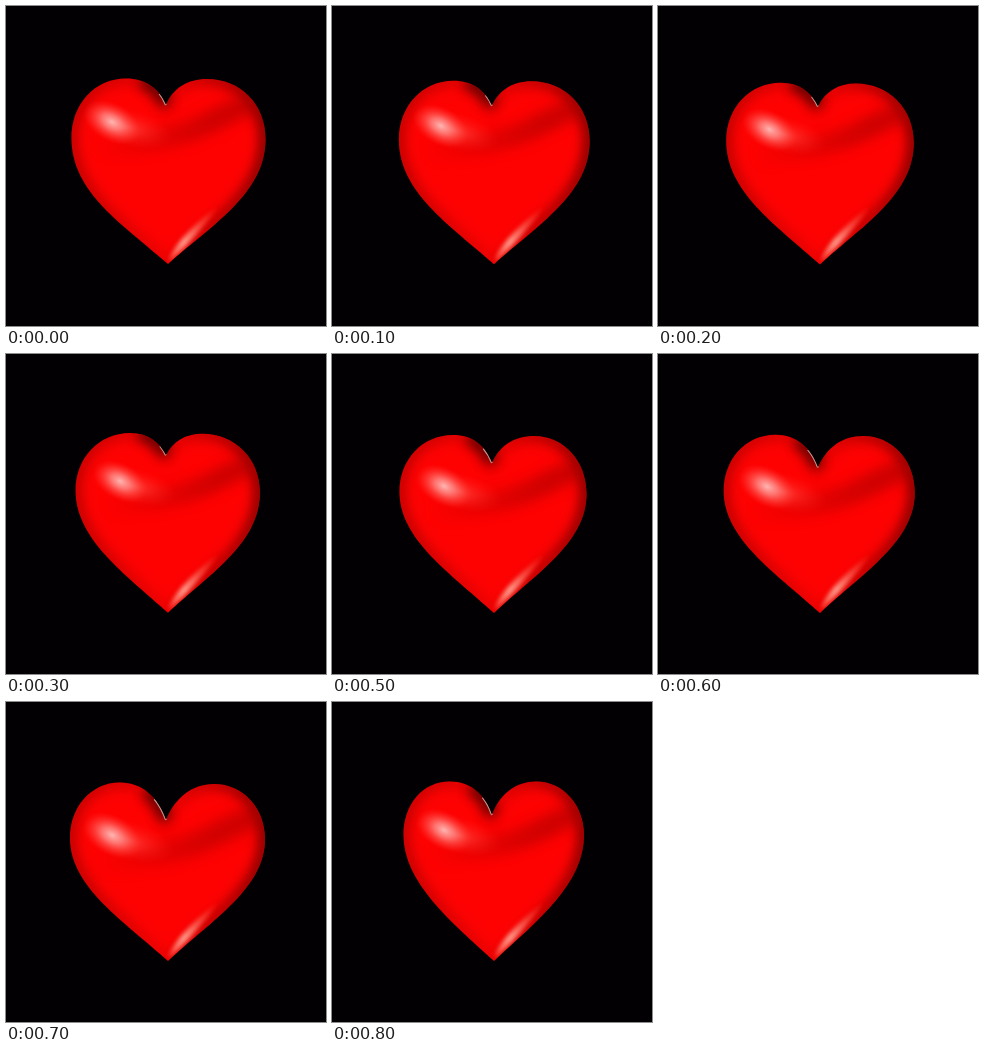
An HTML page without scripts for the animation above (0.9 s loop, 320x320 px).

```html
<!DOCTYPE html>
<html lang="en">
<head>
<meta charset="utf-8">
<title>Beating heart</title>
<style>
html, body { margin: 0; width: 100%; height: 100%; overflow: hidden; background: #020002; }
svg { display: block; width: 100vw; height: 100vh; }

.heart, .light, .glint { animation: 900ms infinite steps(1); }
.heart { animation-name: beat; }
.light { animation-name: drift; transform-origin: 104px 114px; }
.glint { animation-name: beat, stretch; }

/* Outline poses: cleft, left lobe, tip, right lobe */
@keyframes beat {
  0% {
    d: path("M160 99 C153 82 139 72.5 120 72.5 C89 72.5 65.5 98 65.5 132 C65.5 187 118 219 162 258 C207 218 259.5 187 259.5 133 C259.5 98 234 73 201 73 C182 73 167 82 160 99Z");
    animation-timing-function: steps(4);
  }
  44.4% {
    d: path("M160 102 C153 89 142 81 126 81 C94 81 71 106 71 138 C71 184 118 219 162 259 C206 218 252 189 252 140 C252 107 227 82 195 82 C179 82 167 89 160 102Z");
  }
  55.5% {
    d: path("M160 109 C153 91 140 81 121 81 C90 81 67.5 106 67.5 138 C67.5 185 118 219 162 259 C206 218 254.5 188 254.5 140 C254.5 107 232 82 202 82 C183 82 168 91 160 109Z");
    animation-timing-function: steps(2);
  }
  77.7% {
    d: path("M160 118 C152 95 136 80.5 114 80.5 C85 80.5 64 105 64 136 C64 185 118 219 162 259 C206 218 259 186 259 137 C259 106 237 82 208 82 C186 82 169 96 160 118Z");
  }
  88.8%, 100% {
    d: path("M160 113 C153 92 138 79.5 118 79.5 C90 79.5 71.5 103 71.5 133 C71.5 180 118 219 162 259 C206 218 252 182 252 133 C252 104 232 79.5 204 79.5 C185 79.5 168 91 160 113Z");
  }
}
@keyframes drift {
  0% { transform: translate(0, 0) scale(1); animation-timing-function: steps(4); }
  44.4% { transform: translate(11px, 15px) scale(.94); }
  55.5% { transform: translate(6px, 16px) scale(.98); animation-timing-function: steps(2); }
  77.7% { transform: translate(0, 17px) scale(1.04); }
  88.8%, 100% { transform: translate(6px, 12px) scale(.98); }
}
@keyframes stretch {
  0% { stroke-dasharray: 13 2000; animation-timing-function: steps(4); }
  44.4% { stroke-dasharray: 10 2000; }
  55.5% { stroke-dasharray: 17 2000; animation-timing-function: steps(2); }
  77.7% { stroke-dasharray: 24 2000; }
  88.8%, 100% { stroke-dasharray: 20 2000; }
}
</style>
</head>
<body>
<svg viewBox="0 0 320 320">
  <defs>
    <clipPath id="shape"><path class="heart"/></clipPath>
    <radialGradient id="core">
      <stop offset="0" stop-color="#ffc8c4" stop-opacity=".9"/>
      <stop offset=".35" stop-color="#ffa09c" stop-opacity=".65"/>
      <stop offset="1" stop-color="#ff3c34" stop-opacity="0"/>
    </radialGradient>
    <radialGradient id="halo">
      <stop offset="0" stop-color="#ff645c" stop-opacity=".6"/>
      <stop offset="1" stop-color="#ff2018" stop-opacity="0"/>
    </radialGradient>
    <linearGradient id="band" gradientUnits="userSpaceOnUse" x1="90" y1="0" x2="210" y2="0">
      <stop offset="0" stop-color="#a80000" stop-opacity="0"/>
      <stop offset="1" stop-color="#a80000" stop-opacity=".55"/>
    </linearGradient>
    <linearGradient id="rim" gradientUnits="userSpaceOnUse" x1="65" y1="0" x2="255" y2="0">
      <stop offset="0" stop-color="#800000" stop-opacity=".5"/>
      <stop offset=".5" stop-color="#800000" stop-opacity=".15"/>
      <stop offset="1" stop-color="#600000" stop-opacity=".8"/>
    </linearGradient>
    <linearGradient id="streak" gradientUnits="userSpaceOnUse" x1="163" y1="256" x2="210" y2="202">
      <stop offset="0" stop-color="#ff4a3c"/>
      <stop offset=".35" stop-color="#ff9a8a"/>
      <stop offset="1" stop-color="#ff4030" stop-opacity=".3"/>
    </linearGradient>
    <filter id="soft" filterUnits="userSpaceOnUse" x="0" y="0" width="320" height="320"><feGaussianBlur stdDeviation="6"/></filter>
    <filter id="edge" filterUnits="userSpaceOnUse" x="0" y="0" width="320" height="320"><feGaussianBlur stdDeviation="2"/></filter>
  </defs>
  <rect width="320" height="320" fill="#020002"/>
  <g clip-path="url(#shape)">
    <rect width="320" height="320" fill="#fe0202"/>
    <path class="heart" fill="none" stroke="url(#rim)" stroke-width="13" filter="url(#soft)"/>
    <path class="heart" fill="none" stroke="#400000" stroke-width="13" stroke-dasharray="36 2000" opacity=".8" filter="url(#soft)"/>
    <g class="light">
      <path d="M90 141 Q160 138 200 118 T268 88" fill="none" stroke="url(#band)" stroke-width="22" filter="url(#soft)"/>
      <ellipse cx="120" cy="121" rx="48" ry="20" transform="rotate(14 120 121)" fill="url(#halo)"/>
      <ellipse cx="106" cy="116" rx="31" ry="19" transform="rotate(30 106 116)" fill="url(#core)"/>
    </g>
    <path d="M163 256 Q166 236 212 200 Q192 230 163 256Z" fill="url(#streak)" filter="url(#edge)"/>
    <path class="glint" fill="none" stroke="#b8a49c" stroke-width="2" stroke-dasharray="13 2000"/>
  </g>
</svg>
</body>
</html>
```
